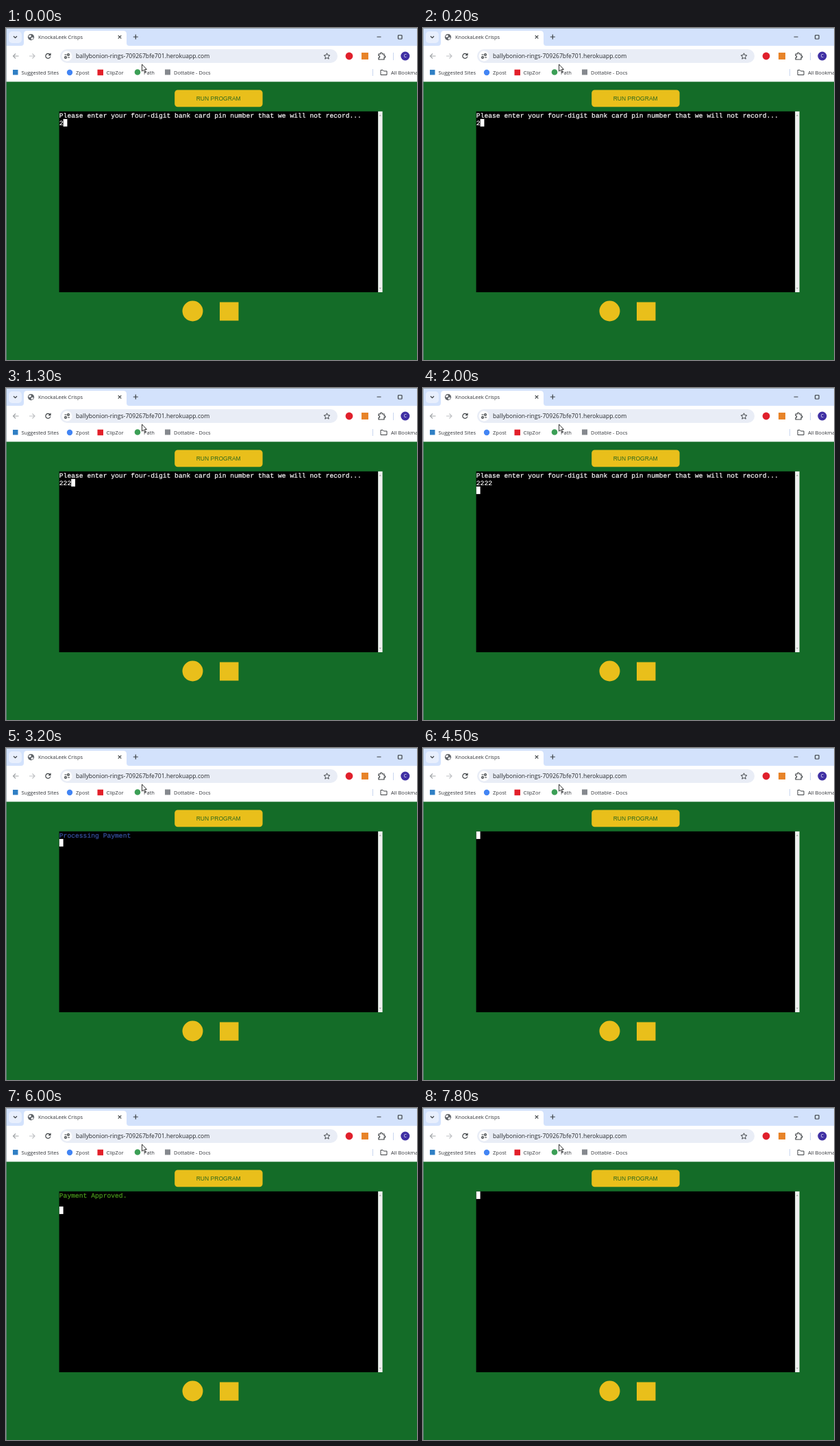
These frames come from a looping animation (600 px wide and 485 px high, 8000 ms). An HTML page:

```html
<!DOCTYPE html>
<html lang="en">
<head>
<meta charset="utf-8">
<title>Terminal payment</title>
<style>
  html, body { margin: 0; width: 100%; height: 100%; overflow: hidden; background: #146c28; }
  svg { display: block; width: 600px; height: 485px; }
  .ui { font: 7.5px "Open Sans", sans-serif; fill: #33363b; }
  .url { font-size: 8.6px; fill: #25282c; }
  .btn { font: 8.55px "Liberation Sans", Arial, sans-serif; fill: #2f6a1e; }
  .term { font: 9.69px "Liberation Mono", "Courier New", monospace; white-space: pre; }
  .term text { stroke: currentColor; stroke-width: .2; fill: currentColor; text-rendering: geometricPrecision; }
  .line { fill: none; stroke: #3c4043; stroke-width: 1.2; }
</style>
</head>
<body>
<svg viewBox="0 0 600 485">
  <!-- tab strip -->
  <rect width="600" height="27" fill="#d3e2fc"/>
  <rect x="4" y="5" width="19" height="17" rx="5" fill="#e8effd"/>
  <path class="line" d="M11 12l2.5 2.5L16 12"/>
  <path d="M22 26q4 0 4-4V9q0-5 5-5H171q5 0 5 5v13q0 4 4 4z" fill="#fff"/>
  <circle cx="36.5" cy="13.3" r="4.6" fill="#5f6368"/>
  <path d="M33 11.5l3-1.5 1 2-1.5 1.5h-2zM37 14l2.5-.5.5 1.5-2 2-1.5-1z" fill="#fff"/>
  <text class="ui" x="47" y="16">KnockaLeek Crisps</text>
  <path class="line" d="M163.7 10.8l4.6 4.6m0-4.6l-4.6 4.6M185.8 13h7M189.3 9.5v7M541.5 13h6"/>
  <rect class="line" x="572.5" y="10.5" width="5.5" height="5.5" rx=".8"/>

  <!-- toolbar -->
  <rect y="26" width="600" height="53" fill="#fff"/>
  <path class="line" d="M18.5 41h-8m3.5-3.5L10.5 41l3.5 3.5" style="stroke:#a2a5a8"/>
  <path class="line" d="M34 41h8m-3.5-3.5L42 41l-3.5 3.5" style="stroke:#c0c2c5"/>
  <path class="line" d="M64.3 39a3.5 3.5 0 1 0 .5 2.5M65 36.8v2.9h-2.9"/>
  <rect x="79" y="31" width="405" height="20" rx="10" fill="#e9edf6"/>
  <circle cx="89" cy="41" r="7.5" fill="#fff"/>
  <path class="line" d="M85.5 39h3M90 43h3.2"/>
  <circle class="line" cx="91" cy="39" r="1.4"/>
  <circle class="line" cx="87" cy="43" r="1.4"/>
  <text class="ui url" x="102" y="44">ballybonion-rings-709267bfe701.herokuapp.com</text>
  <path class="line" style="stroke-width:1" d="M468.500 36.800l1.300 2.900 3.100.3-2.400 2.100.7 3.100-2.700-1.600-2.700 1.600.7-3.100-2.400-2.100 3.100-.3z"/>
  <circle cx="501" cy="41" r="5.4" fill="#e0202c"/>
  <rect x="519" y="36" width="10" height="10" fill="#e88429"/>
  <path class="line" d="M544 38h2.5q-.3-2 1.3-2t1.3 2h2.9v2.7q1.8-.2 1.8 1.2T552 43.2V46h-8v-2.6q1.7-.2 1.7-1.5T544 40.500z"/>
  <path d="M565.5 36v11" stroke="#c9d7f0"/>
  <circle cx="582.8" cy="41" r="6.5" fill="#4030a4"/>
  <text class="ui" x="580.7" y="43.3" style="fill:#fff;font-size:6.5px">C</text>

  <!-- bookmarks -->
  <g class="ui">
    <rect x="10" y="61" width="7.5" height="7.5" fill="#2f7fc4"/>
    <text x="22.5" y="67.5">Suggested Sites</text>
    <circle cx="93" cy="65" r="4.2" fill="#4285f4"/>
    <text x="102" y="67.5">Zpost</text>
    <rect x="133.5" y="60.7" width="8.5" height="8.5" fill="#e3202a"/>
    <text x="146.5" y="67.5">ClipZor</text>
    <circle cx="192" cy="64.5" r="4.3" fill="#3c9f56"/>
    <text x="201" y="67.5">Path</text>
    <rect x="232" y="60.5" width="8" height="8" fill="#85898e"/>
    <text x="245" y="67.5">Dottable - Docs</text>
    <path d="M535.5 60v10" stroke="#c9d7f0"/>
    <path class="line" style="stroke-width:1" d="M547 61.5h3.3l1.2 1.5h4.5v5.5h-9z"/>
    <text x="562" y="67.5">All Bookmarks</text>
  </g>

  <!-- page -->
  <rect y="78.5" width="600" height="407" fill="#146c28"/>
  <rect x="246.2" y="90.4" width="128.4" height="24.9" rx="4.500" fill="#e9bf1b"/>
  <text class="btn" x="277.7" y="106">RUN PROGRAM</text>
  <rect x="77.6" y="121.8" width="465.6" height="264.2"/>
  <rect x="543.2" y="121.8" width="6.4" height="264.2" fill="#f0f0f0"/>
  <path d="M544.8 128.500l1.500-1.900 1.500 1.900zM544.8 379.500l1.500 1.900 1.500-1.900z" fill="#a0a0a0"/>
  <circle cx="272.5" cy="413.5" r="15" fill="#e9bf1b"/>
  <rect x="312" y="400.5" width="27.5" height="27" fill="#e9bf1b"/>

  <!-- window edge -->
  <path d="M.5 485V.5H600" fill="none" stroke="#7f8f96" stroke-opacity=".7"/>

  <g class="term">
    <text id="row0" x="77.8" y="131"></text>
    <text id="row1" x="77.8" y="142" color="#fff"></text>
    <rect id="caret" width="5.8" height="11" fill="#fff"/>
  </g>

  <path d="M198.5 53v10.2l2.3-2.1 1.7 3.600 1.500-.7-1.600-3.500h3z" fill="#fff" stroke="#222" stroke-width=".9"/>
</svg>
<script>
const LOOP = 8000, COL = 5.81, ROW = 11;
const WHITE = "#fff", BLUE = "#3854a4", GREEN = "#4a9c1c";
const el = id => document.getElementById(id);

const ask = "Please enter your four-digit bank card pin number that we will not record...";
const pin = n => [ask, WHITE, "2".repeat(n), n, 1];
const paying = dots => ["Processing Payment" + ".".repeat(dots), BLUE, "", 0, 1];
const blank = ["", WHITE, "", 0, 0];

// start time, then [first row, its colour, second row, caret column, caret row]
const steps = [
  [0, pin(1)], [1000, pin(2)], [1300, pin(3)], [1500, pin(4)],
  [1900, [ask, WHITE, "2222", 0, 2]],
  [2700, paying(0)], [3800, paying(1)], [3900, paying(2)], [4000, paying(3)],
  [4500, blank],
  [4700, paying(0)], [5000, paying(2)], [5300, paying(3)],
  [5700, ["Payment Approved.", GREEN, "", 0, 2]],
  [7800, blank]
];

let shown;
function draw(time) {
  const state = steps.findLast(([start]) => start <= time)[1];
  if (state === shown) return;
  shown = state;
  const [first, color, second, col, row] = state;
  el("row0").textContent = first;
  el("row0").style.color = color;
  el("row1").textContent = second;
  el("caret").setAttribute("x", 77.8 + col * COL);
  el("caret").setAttribute("y", 121.9 + row * ROW);
}

const begin = performance.now();
function tick() {
  draw((performance.now() - begin) % LOOP);
  requestAnimationFrame(tick);
}
tick();
</script>
</body>
</html>
```
